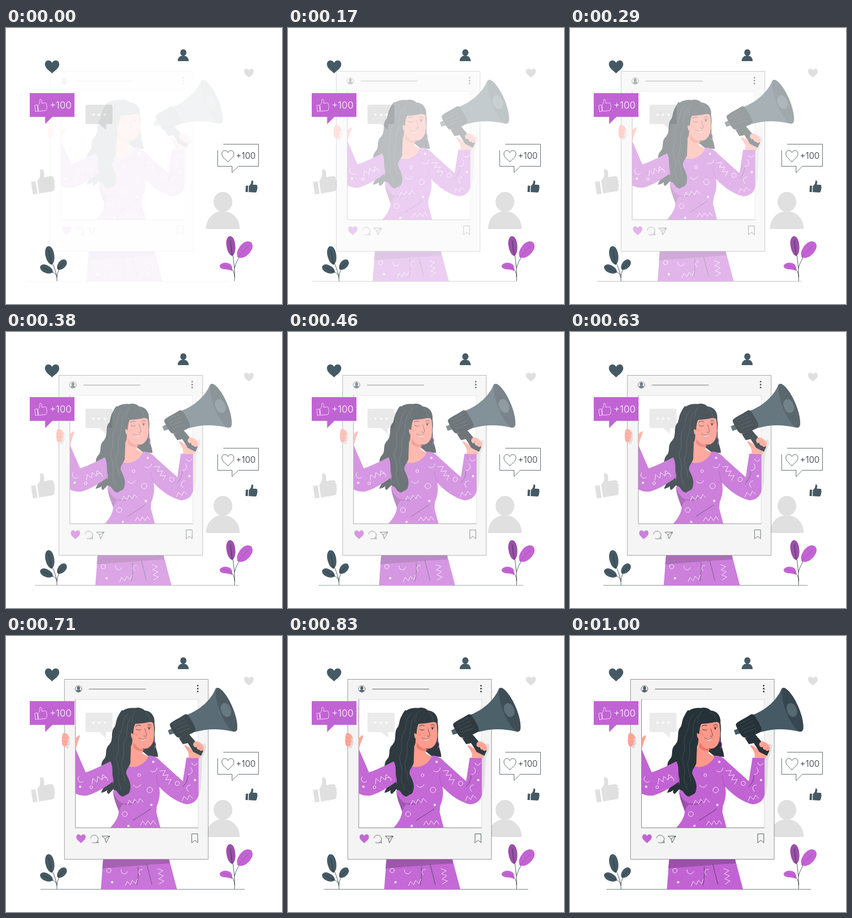
Animation of 500 by 500 pixels, one loop 1.04 s. Source, as an HTML page with a canvas:

```html
<!DOCTYPE html>
<html lang="en">
<head>
<meta charset="utf-8">
<title>Social post</title>
<style>
html, body { margin: 0; width: 100%; height: 100%; overflow: hidden; background: #fff; }
canvas { display: block; width: 500px; height: 500px; }
</style>
</head>
<body>
<canvas id="stage" width="500" height="500"></canvas>
<script>
const PURPLE = '#c263d4', PLUM = '#9b4faa', SLATE = '#455a64', INK = '#263238';
const GREY = '#e0e0e0', SKIN = '#ff9889', HAND = '#ffa596', BLUSH = '#e9786c';
const LOOP = 1040, STEPS = 25, TRAVEL = 32;

const stage = document.getElementById('stage').getContext('2d');
const layer = document.createElement('canvas');
layer.width = layer.height = 500;
const layerCtx = layer.getContext('2d');
let g = stage;

function fill(color, d, rule) {
  g.fillStyle = color;
  g.fill(new Path2D(d), rule || 'nonzero');
}

function line(color, width, d) {
  g.strokeStyle = color;
  g.lineWidth = width;
  g.lineCap = g.lineJoin = 'round';
  g.stroke(new Path2D(d));
}

function oval(x, y, rx, ry, color, tilt = 0) {
  g.beginPath();
  g.ellipse(x, y, rx, ry, tilt * Math.PI / 180, 0, 7);
  g.fillStyle = color;
  g.fill();
}

function arc(x, y, r, from, to, color = '#fff', width = 0.8) {
  g.beginPath();
  g.arc(x, y, r, from, to);
  g.strokeStyle = color;
  g.lineWidth = width;
  g.stroke();
}

function ring(x, y, r) { arc(x, y, r, 0, 7); }

function zigzag(x, y, len, amp, tilt, n = 6) {
  const a = tilt * Math.PI / 180, c = Math.cos(a), s = Math.sin(a);
  let d = '';
  for (let i = 0; i <= n; i++) {
    const u = len * i / n, v = i % 2 ? -amp : amp;
    d += (i ? 'L' : 'M') + (x + u * c - v * s) + ' ' + (y + u * s + v * c);
  }
  line('#fff', 0.8, d);
}

function placed(x, y, sx, sy, tilt, draw) {
  g.save();
  g.translate(x, y);
  g.rotate(tilt * Math.PI / 180);
  g.scale(sx, sy);
  draw();
  g.restore();
}

const HEART = 'M0 10.5C-3 7-12 2.5-12-4.5C-12-12-3-13 0-7C3-13 12-12 12-4.5C12 2.5 3 7 0 10.5Z';
const THUMB = 'M0 21L9 21L9 45L0 45ZM12 21C18 17 20 11 20 4C20-1 25-1 27 4C28 8 27 12 26 16L39 16C44 17 45 20 43 23C46 26 45 29 43 31C45 34 44 37 42 38C43 42 41 45 37 45L12 45Z';

function heart(x, y, w, h, color) {
  placed(x, y, w / 24, h / 20.5, 0, () => fill(color, HEART));
}

function thumb(x, y, size, tilt, color, outline) {
  const k = size / 45;
  placed(x, y, k, k, tilt, () => outline ? line(color, 0.7 / k, THUMB) : fill(color, THUMB));
}

function leaf(x, y, rx, ry, tilt, color, vein) {
  placed(x, y, rx, ry, tilt, () =>
    fill(color, 'M0 1C-.75 .85-1 .3-1-.2C-.9-.8-.4-1 0-1C.5-1 1-.7 1-.1C1 .5 .6 .9 0 1Z'));
  placed(x, y, 1, 1, tilt, () => line(vein, 0.7, `M0 ${-ry * 0.55}L0 ${ry}`));
}

function label(x, y, size, color) {
  g.font = `300 ${size}px Inter, "Open Sans", sans-serif`;
  g.fillStyle = color;
  g.fillText('+100', x, y);
}

function drawBehind() {
  fill('#e4e4e4', 'M147 139H190Q193 139 193 142V171Q193 174 190 174H181V184.500L169 174H147Q144 174 144 171V142Q144 139 147 139Z');
  for (const x of [158.5, 168.5, 178.5]) oval(x, 157, 2, 2, '#fff');
  thumb(42, 259, 43, -9, GREY);
  oval(393, 315, 17, 18, GREY);
  fill(GREY, 'M362 364C363 345 375 332 393 332C411 332 423 346 423.500 364Z');
}

function drawFront() {
  heart(83.5, 70.7, 26, 22.5, SLATE);
  heart(440, 82, 18, 15.5, GREY);
  oval(321.3, 44.5, 5.6, 6, SLATE);
  fill(SLATE, 'M311 60C311 53 316 50 321 50C327 50 331 54 331 60Z');
  thumb(435, 275.5, 21.5, 3, SLATE);

  fill(PURPLE, 'M43 118H124V161H84L71 174V161H43Z');
  thumb(51.5, 130, 21.5, -6, '#fff', true);
  label(79, 146, 17.4, '#fff');

  line(INK, 0.7, 'M394 210.500H457.500V250.500H421L409.500 262V250.500H383.500V222');
  placed(402, 232.3, 0.91, 0.95, 0, () => line(INK, 0.8, HEART));
  label(416.5, 237, 15.7, INK);

  line(INK, 0.8, 'M92.500 458C92 446 88 435 84 426M92 449C89 444 84 441 80 440M92.500 452C92 445 95 439 99 434');
  leaf(79.5, 412, 8, 17, -10, SLATE, INK);
  leaf(73.5, 437, 7, 12.5, -64, SLATE, INK);
  leaf(101, 429, 7, 11, 42, SLATE, INK);

  line(INK, 0.8, 'M414 458C415 443 413 427 411 411M414 435C416 426 420 419 426 410M414 451C414 443 411 438 406 434');
  leaf(407.5, 395, 8, 18, -7, PLUM, INK);
  leaf(432, 402, 10.5, 18, 42, PURPLE, PLUM);
  fill(PURPLE, 'M387 431C389 425 399 424 405 427C410 430 411 436 409 440C405 437 399 438 394 437C390 436 387 434 387 431Z');
  line(PLUM, 0.6, 'M393 430C400 431 406 434 409 439');
}

function drawLegs() {
  line(INK, 0.7, 'M66.500 459H436');
  fill(PURPLE, 'M180 400H298L313.500 459H175.500Z');
  fill(PLUM, 'M180 402H299L300 412C260 414 220 418 178 421Z');
  line(INK, 0.7, 'M243 418C244 430 243 442 241 451M259 414L268 450');
  ring(190, 425, 4);
  oval(196, 446, 2, 2, '#fff');
  arc(218, 425, 6, 0.3, 3.4);
  arc(249, 428, 5, 2, 5);
  zigzag(219, 449, 24, 3.5, -12, 5);
  zigzag(283, 421, 28, 4.5, 84);
}

function drawFrame() {
  fill('rgba(255,255,255,.28)', 'M129.500 115H352V347H129.500Z');
  fill('#f4f4f4', 'M110 78.500H370V404.500H110ZM129.500 115V347.500H352V115Z', 'evenodd');
  line('#666', 0.7, 'M110 78.500H370V404.500H110Z');
  line('#555', 0.7, 'M129.500 115V347.500H352');
  line('#bbb', 0.5, 'M129.500 115H352V347');

  arc(135, 96, 6, 0, 7, INK, 0.7);
  oval(135, 94.3, 2.8, 3, SLATE);
  fill(SLATE, 'M130.500 99C132 96.500 138 96.500 139.500 99C138 102 132 102 130.500 99Z');
  line('#8b8b8b', 1.6, 'M154.500 96.300H256.500');
  for (const y of [90, 95.3, 100.5]) oval(351, y, 1.4, 1.5, INK);

  heart(139.5, 367.5, 17, 15.5, PURPLE);
  line(INK, 0.7, 'M157 366C158 359 168 359 170.500 366C172 373 165 377 160 374M170 371L171 375L167 374');
  line(INK, 0.8, 'M178 362.500H191.500L185 374.500L183 367.500ZM183 367.500L191.500 362.500');
  line(INK, 0.8, 'M340.500 358.500H351V374.500L345.700 370L340.500 374.500Z');
}

function drawBody() {
  fill(INK, 'M214 134C203 146 206 158 202 166C192 174 199 186 192 196C181 204 188 214 182 222C176 228 176 234 177 240L192 250L184 268C181 274 177 280 176 284C181 283 184 282 187 279C186 283 187 286 190 286C196 280 206 270 208 255L240 200L262 218L279 219C279 209 274 203 275 196C272 190 274 180 272 172Z');
  line(PLUM, 1.3, 'M271 189C275 193 276 198 273 203');
  fill(SKIN, 'M231 176L226 246H244L265 220L251 213L252 194Z');
  fill(BLUSH, 'M235 193C240 202 249 206 255 205C250 211 238 208 234 201Z');
  // thumb of the hand holding the frame
  fill(HAND, 'M128 186C131 185 134 179 137 180C139 182 134 190 133 195L129 208Z');
  fill(PURPLE, 'M128 201L148 247C166 241 180 233 195 226L229 237C242 239 257 231 262 217C270 216 279 221 285 228L324 263L330.500 220.500H356C356 242 356 263 354 282C352 296 345 304 331 305C314 301 298 291 281 273C284 286 281 298 277 308L276 319L283.500 348H192C201 338 207 329 208 318C205 306 199 295 197 264C185 273 168 284 151 289C141 290 133 288 128 284Z');
  fill(PLUM, 'M197 276C199 288 205 301 218 304C211 307 210 313 208 318C205 308 198 296 197 276Z');
  line(PLUM, 0.8, 'M281 273C278 268 277 260 276 253M197 264C196 258 196 250 197 244');
  line(INK, 0.7, 'M218 304C228 307 236 303 240 299M234 334C244 327 257 320 266 313M333 253C333 263 328 269 324 273');
}

function drawPattern() {
  zigzag(158, 264, 29, 4.5, -22);
  arc(140, 259, 6, 0.8, 4);
  oval(138, 273, 2, 2, '#fff');
  ring(158, 274, 2.5);
  arc(183, 261, 5, 3.5, 6.5);
  oval(270.5, 228, 2, 2, '#fff');
  arc(270, 239, 7, 0, 2.3);
  arc(241, 267, 7, 0.3, 2.7);
  ring(245, 252, 2.5);
  zigzag(286, 242, 29, 4.5, 57);
  ring(264, 279, 5);
  zigzag(223, 302, 29, 3.8, -10);
  oval(267, 306, 2, 2, '#fff');
  ring(219, 322.5, 4.5);
  oval(225.5, 344, 2, 2, '#fff');
  zigzag(247, 339, 28, 3.6, -3);
  ring(314, 267, 4);
  zigzag(322, 295, 20, 3.6, -12, 4);
  arc(345, 229, 5, 0.2, 3);
  arc(334, 244, 7, -1, 1.6);
  oval(346, 261, 2, 2, '#fff');
  arc(337, 276, 6, 2, 4.8);
}

function drawHead() {
  fill(INK, 'M237 130.500C226 129 216 132 211 141C203 147 204 156 201 164C193 172 198 182 194 192C186 201 190 211 191 224C199 235 195 248 198 258C200 266 193 276 200 279C207 280 206 289 216 291C222 286 226 288 228 281C232 268 225 258 222 251C219 243 227 238 229 230C229 218 230 208 230 200C234 193 231 190 234 184L251 170L271 186C274 176 274 166 272.500 158C274 147 268 136 255 135C250 130 243 129 237 130.500Z');
  fill(SKIN, 'M234 158C246 160 259 157 270 154C272 165 273 178 271 188C269 198 262 205 254 204C245 203 237 197 233 187C228 181 230 171 234 169Z');
  fill(INK, 'M228 174C228 161 227 149 235 141L264 141C270 146 272.500 152 272 160C270 158 269 156 267 156C260 154 247 158 238 159C235 164 235 170 234 178Z');
  line(SLATE, 0.7, 'M225 140C211 154 218 166 210 178C203 190 211 201 205 214C200 225 211 239 207 253C204 263 212 270 212 279M231 145C219 160 226 174 220 188C213 200 221 213 214 226C211 240 219 250 219 263M239 136C230 142 235 150 231 156M256 138C263 142 262 149 265 153');
  line(INK, 1, 'M239 163.500C242 161 245 161 248 162.500M260 162C262 160 265 160.500 267 162M240 169C243 171 246 171 248 169.500');
  oval(263, 167.5, 1.4, 2, INK);
  line(INK, 0.7, 'M260 166C262 164 265 164.500 267 166');
  line(INK, 0.7, 'M255 168C256 173 259 178 258 181C257 182 255 182 253.500 181');
  oval(239, 178, 4, 2.5, '#ff8e7e');
  fill('#fff', 'M246 186C250 188.500 254 188 257 185C255 190.500 249 190.500 246 186Z');
  line(INK, 0.7, 'M244 184.500C250 189 254 188 257.500 184');
}

function drawMegaphone() {
  fill('#dedede', 'M355 200C361 193 367 194 366 202C365 211 360 216 359 225L357 272C356 282 353 287 352.500 289V224Z');
  fill(HAND, 'M327 198C332 198 337 203 341 206L346 194C350 189 356 192 361 199C364 205 360 212 356 215L355 221H334C337 214 331 205 327 200Z');
  fill(SLATE, 'M297 171L309 165L313 175L300 179Z');
  fill(INK, 'M317 185L334 176L338 181L361 208L357 217L343 210L333 194L324 196Z');
  const bell = 'M331 143C355 134 375 116 383 96C386 90 395 96 404 110C416 129 424 154 422.500 168C421.500 174 417 174 412 172.500C390 167 365 168 346 174Z';
  fill(SLATE, bell);
  g.save();
  g.clip(new Path2D(bell));
  oval(403.5, 133.5, 12.5, 43, '#37474f', -22);
  g.restore();
  oval(402, 134, 9, 13, '#556972', -22);
  fill(INK, 'M303 157C310 152 322 146 328 142C333 140 336 147 341 155C347 166 349 171 345 174C336 179 324 182 318 184C312 185 308 177 304 169C300 162 299 160 303 157Z');
  line(SLATE, 0.7, 'M307 160L327 149M309 165L331 154M312 170L334 161M315 175L337 167');
  fill(HAND, 'M343 198C342 194 346 190 350 191C354 192 354 197 357 197C361 198 363 204 360 206C359 209 356 209 354 206C351 206 349 204 349 201C346 202 344 201 343 198Z');
  line(BLUSH, 0.7, 'M349 201C349 198 352 197 355 198M354 206C354 203 357 202 360 203M328 200C334 205 337 210 340 211');
}

function drawGrip() {
  fill('#dadada', 'M113 180C119 179 121 185 119 190C121 194 119 198 117 199C118 204 113 205 112 201Z');
  fill(HAND, 'M107 176C112 174 118 180 118 184C117 187 115 187 113 186C118 188 118 192 114 193C117 196 115 199 112 198C113 201 110 202 107 199C104 196 104 181 107 176Z');
  line(BLUSH, 0.7, 'M113 186L107 183M114 193L107 190M112 198L107 195');
}

function drawPost() {
  drawLegs();
  drawFrame();
  g.save();
  g.beginPath();
  g.rect(129.5, 80, 300, 267);
  g.clip();
  drawBody();
  drawPattern();
  drawHead();
  g.restore();
  drawMegaphone();
  drawGrip();
}

// cubic-bezier(0, 0, .58, 1)
function easeOut(t) {
  let lo = 0, hi = 1;
  for (let i = 0; i < 24; i++) {
    const s = (lo + hi) / 2;
    if (1.74 * s * s - 0.74 * s * s * s < t) lo = s; else hi = s;
  }
  return lo * lo * (3 - 2 * lo);
}

function render(ms) {
  const step = Math.min(STEPS - 1, Math.floor((ms % LOOP + 5) * STEPS / LOOP));
  const p = easeOut((step + 1) / STEPS);

  g = layerCtx;
  g.clearRect(0, 0, 500, 500);
  g.save();
  g.translate((p - 1) * TRAVEL, 0);
  drawPost();
  g.restore();

  g = stage;
  g.fillStyle = '#fff';
  g.fillRect(0, 0, 500, 500);
  drawBehind();
  g.globalAlpha = p;
  g.drawImage(layer, 0, 0);
  g.globalAlpha = 1;
  drawFront();
}

const start = performance.now();
function tick() {
  render(performance.now() - start);
  requestAnimationFrame(tick);
}
tick();
</script>
</body>
</html>
```
